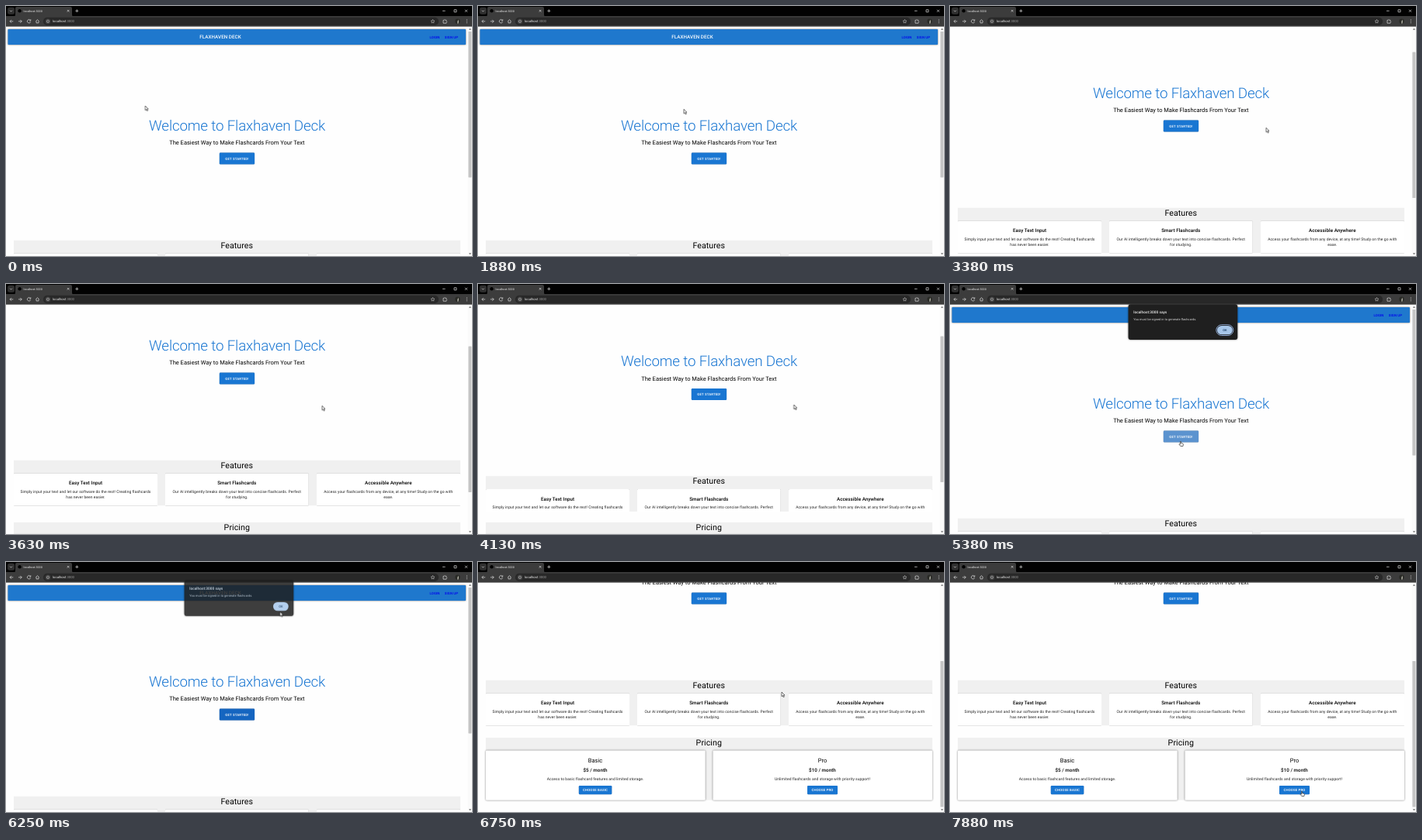
An HTML page for the animation above (8 s loop, 600x323 px).

```html
<!DOCTYPE html>
<html lang="en">
<head>
<meta charset="utf-8">
<title>Flaxhaven Deck</title>
<style>
html, body { margin: 0; width: 100%; height: 100%; overflow: hidden; background: #fff; }
svg { display: block; width: 100vw; height: 100vh; }
svg, .cursor, .arrow, .hand, .dialog, .ring, .start { animation: 8s step-end infinite; }
svg { --scroll: 0px; --lower: 0px; animation-name: scroll; }
text { font-family: Roboto, Arial, sans-serif; text-rendering: geometricPrecision; }
.mid { text-anchor: middle; }
.page { transform: translateY(calc(-1 * var(--scroll))); }
.lower { transform: translateY(calc(-1 * var(--lower))); }
.thumb { transform: translateY(calc(.633 * var(--scroll))); }
.h2 { font-size: 18.75px; font-weight: 300; letter-spacing: -.156px; fill: #1976d2; }
.h4 { font-size: 10.625px; letter-spacing: .078px; }
.h5 { font-size: 7.5px; }
.h6 { font-size: 6.25px; font-weight: 500; letter-spacing: .047px; }
.body { font-size: 5px; letter-spacing: .047px; fill: #222; }
.label { font-size: 4.375px; font-weight: 500; letter-spacing: .125px; fill: #fff; }
.link { fill: #00e; }
.band { fill: #f0f0f0; }
.card { fill: #fff; filter: drop-shadow(0 .5px .6px #0006); }
.raised { filter: drop-shadow(0 .8px .9px #0008); }
.button { fill: #1976d2; filter: drop-shadow(0 .7px .6px #0005); }
.start { animation-name: press; }
.icon { fill: none; stroke: #ddd; stroke-width: .7; }
.cursor { animation-name: move; }
.arrow { animation-name: arrow; }
.hand { animation-name: hand; }
.arrow, .hand { fill: #fff; stroke: #111; stroke-width: .6; stroke-linejoin: round; }
.dialog { animation-name: dialog; }
.ring { animation-name: ring; }

@keyframes scroll {
  0% { --scroll: 0px; --lower: 0px; }
  42.18% { --scroll: 42px; --lower: 42px; }
  43.75% { --scroll: 69px; --lower: 69px; }
  45.31% { --scroll: 75px; --lower: 69px; }
  50% { --scroll: 69px; --lower: 69px; }
  51.56% { --scroll: 54.5px; --lower: 69px; }
  53.12% { --scroll: 36px; --lower: 36px; }
  54.68% { --scroll: 18px; --lower: 18px; }
  56.25% { --scroll: 5px; --lower: 5px; }
  57.81% { --scroll: 0px; --lower: 0px; }
  81.25% { --scroll: 45px; --lower: 45px; }
  82.81% { --scroll: 118px; --lower: 118px; }
  84.37%, 100% { --scroll: 150px; --lower: 150px; }
}
@keyframes move {
  0% { transform: translate(179.3px, 129px); }
  17.18% { transform: translate(322px, 172px); }
  20.31% { transform: translate(360px, 202px); }
  21.87% { transform: translate(312px, 167px); }
  23.43% { transform: translate(265px, 133.3px); }
  26.56% { transform: translate(251.5px, 148px); }
  32.81% { transform: translate(243px, 152px); }
  42.18% { transform: translate(407px, 157.3px); }
  50% { transform: translate(406.7px, 156px); }
  56.25% { transform: translate(392px, 161px); }
  57.81% { transform: translate(362px, 176px); }
  59.37% { transform: translate(328px, 192px); }
  60.93% { transform: translate(304px, 201px); }
  62.5% { transform: translate(297px, 203px); }
  68.75% { transform: translate(303px, 181px); }
  70.31% { transform: translate(320px, 138px); }
  71.87% { transform: translate(341px, 91px); }
  73.43% { transform: translate(351px, 68px); }
  75% { transform: translate(352.7px, 64.3px); }
  79.68% { transform: translate(356px, 78px); }
  81.25% { transform: translate(370px, 120px); }
  82.81% { transform: translate(384px, 150px); }
  84.37% { transform: translate(391px, 168px); }
  85.93% { transform: translate(397px, 180px); }
  87.5% { transform: translate(402px, 190px); }
  92.18% { transform: translate(413px, 215px); }
  93.75% { transform: translate(427px, 245px); }
  95.31% { transform: translate(440px, 272px); }
  96.87% { transform: translate(450px, 291px); }
  98.43%, 100% { transform: translate(453px, 296px); }
}
@keyframes arrow {
  0% { opacity: 1; }
  60.93% { opacity: 0; }
  68.75% { opacity: 1; }
  96.87%, 100% { opacity: 0; }
}
@keyframes hand {
  0% { opacity: 0; }
  60.93% { opacity: 1; }
  68.75% { opacity: 0; }
  96.87%, 100% { opacity: 1; }
}
@keyframes press {
  0% { fill: #1976d2; }
  60.93% { fill: #1565c0; }
  64.06% { fill: #5b93cf; }
  75% { fill: #1565c0; }
  79.68%, 100% { fill: #1976d2; }
}
@keyframes dialog {
  0% { opacity: 0; transform: none; }
  64.06% { opacity: .7; transform: translateY(-2px); }
  65.62% { opacity: 1; transform: none; }
  78.12% { opacity: .86; transform: translateY(-2.2px); }
  79.68%, 100% { opacity: 0; transform: none; }
}
@keyframes ring {
  0% { opacity: 1; }
  76.56%, 100% { opacity: 0; }
}
</style>
</head>
<body>
<svg viewBox="0 0 600 323" preserveAspectRatio="none">
  <rect width="600" height="323" fill="#fefefe"/>

  <g class="page">
    <rect class="raised" x="2.5" y="30" width="589.5" height="20" rx=".8" fill="#1f78cd"/>
    <text class="h6 mid" x="276" y="42.2" fill="#fff">FLAXHAVEN DECK</text>
    <text class="label link mid" x="552" y="41.6">LOGIN</text>
    <text class="label link mid" x="573.5" y="41.6">SIGN UP</text>

    <text class="h2 mid" x="297.5" y="160.8">Welcome to Flaxhaven Deck</text>
    <text class="h5 mid" x="297.3" y="179.4">The Easiest Way to Make Flashcards From Your Text</text>
    <rect class="button start" x="274.8" y="189.6" width="45.3" height="15" rx="1.25"/>
    <text class="label mid" x="297.5" y="198.7">GET STARTED!</text>

    <rect class="band" x="10" y="302.8" width="575" height="58.5"/>
    <text class="h4 mid" x="297.3" y="312.8">Features</text>
    <rect class="card" x="10" y="319.6" width="185" height="42" rx="1.25"/>
    <rect class="card" x="205" y="319.6" width="184.7" height="42" rx="1.25"/>
    <rect class="card" x="400" y="319.6" width="185" height="42" rx="1.25"/>
    <g class="mid">
      <text class="h6" x="102.5" y="334.3">Easy Text Input</text>
      <text class="body" x="102.5" y="344.7">Simply input your text and let our software do the rest! Creating flashcards</text>
      <text class="body" x="102.5" y="352.2">has never been easier.</text>
      <text class="h6" x="297.3" y="334.3">Smart Flashcards</text>
      <text class="body" x="297.3" y="344.7">Our AI intelligently breaks down your text into concise flashcards. Perfect</text>
      <text class="body" x="297.3" y="352.2">for studying.</text>
      <text class="h6" x="492.3" y="334.3">Accessible Anywhere</text>
      <text class="body" x="492.3" y="344.7">Access your flashcards from any device, at any time! Study on the go with</text>
      <text class="body" x="492.3" y="352.2">ease.</text>
    </g>
  </g>

  <g class="lower">
    <rect y="363" width="594" height="130" fill="#fefefe"/>
    <rect class="band" x="10" y="377" width="575" height="80.5"/>
    <text class="h4 mid" x="297.3" y="387.2">Pricing</text>
    <rect class="card raised" x="10" y="393.6" width="282.7" height="64.2" rx="1.25"/>
    <rect class="card raised" x="302.5" y="393.6" width="282.5" height="64.2" rx="1.25"/>
    <rect class="button" x="129.8" y="439" width="42.5" height="11.2" rx="1.25"/>
    <rect class="button" x="424" y="439" width="39" height="11.2" rx="1.25"/>
    <g class="mid">
      <text class="h5" x="151" y="409">Basic</text>
      <text class="h6" x="151" y="421.2">$5 / month</text>
      <text class="body" x="151" y="431.8">Access to basic flashcard features and limited storage.</text>
      <text class="label" x="151" y="446.2">CHOOSE BASIC</text>
      <text class="h5" x="443.5" y="409">Pro</text>
      <text class="h6" x="443.5" y="421.2">$10 / month</text>
      <text class="body" x="443.5" y="431.8">Unlimited flashcards and storage with priority support!</text>
      <text class="label" x="443.5" y="446.2">CHOOSE PRO</text>
    </g>
  </g>

  <!-- Scrollbar -->
  <rect x="594.5" y="26" width="5.5" height="297" fill="#fafafa"/>
  <rect class="thumb" x="595.4" y="33" width="4" height="188.5" rx=".4" fill="#c4c4c4"/>
  <path d="M596 30.8l1.5-2 1.5 2zM596 319.3l1.5 2 1.5-2z" fill="#666"/>

  <!-- Browser chrome -->
  <rect width="600" height="14" fill="#020202"/>
  <path d="M10 13.5q2 0 2-2V3q0-2 2-2h69q2 0 2 2v8.500q0 2 2 2z" fill="#3c3c3c"/>
  <rect y="13" width="600" height="13.6" fill="#3c3c3c"/>
  <rect x="2" y="1.800" width="9" height="9" rx="2.500" fill="#303030"/>
  <circle cx="17.600" cy="6.300" r="2.200" fill="#000"/>
  <text x="22.500" y="7.700" font-size="3.700" fill="#eee">localhost:3000</text>
  <rect x="48" y="14.700" width="509" height="10.300" rx="5.100" fill="#282828"/>
  <circle cx="54" cy="19.800" r="3.600" fill="#3c3c3c"/>
  <text x="60" y="21.300" font-size="4.250" fill="#eee">localhost<tspan fill="#999">:3000</tspan></text>
  <g class="icon">
    <path d="M5 5.700l1.500 1.500 1.500-1.500M78.800 5l2.600 2.600m0-2.600l-2.600 2.600M89.300 6.300h4m-2-2v4"/>
    <path d="M562 6.300h3.600M577 4.800h3v3h-3zM591 4.800l3 3m0-3l-3 3"/>
    <path d="M9.300 19.800H5m2-2l-2 2 2 2M16 19.800h4.300m-2-2l2 2-2 2"/>
    <path d="M31.400 18.500a2.200 2.200 0 1 0 .3 1.900M31.800 17.200v1.800H30"/>
    <path d="M38.500 19.500l2-1.900 2 1.900M39 19.200v2.700h3v-2.700"/>
    <circle cx="54" cy="19.800" r="1.700" stroke-width=".5"/>
    <path d="M54 19.500v1.200" stroke-width=".5"/>
    <path d="M549.500 17.500l.7 1.500 1.700.2-1.200 1.100.3 1.700-1.500-.8-1.500.8.3-1.700-1.200-1.100 1.700-.2z" stroke-width=".5"/>
    <path d="M563 18.300h1.300q.7-1.600 1.400 0h1.300v1.300q1.400.7 0 1.400v1.200h-4z"/>
  </g>
  <circle cx="581.500" cy="19.800" r="3.200" fill="#292a26"/>
  <path d="M581.400 22.700q-.3-3.500.9-5.300 1 2.300.1 5.300z" fill="#c9c9bd"/>
  <g fill="#ddd"><circle cx="593.300" cy="17.800" r=".5"/><circle cx="593.300" cy="19.800" r=".5"/><circle cx="593.300" cy="21.800" r=".5"/></g>

  <g class="dialog">
    <rect class="raised" x="229.600" y="26.300" width="140.600" height="45.700" rx="3" fill="#1f1f1f"/>
    <text x="236.300" y="38" font-size="4.800" font-weight="500" fill="#eee">localhost:3000 says</text>
    <text x="236.300" y="46.900" font-size="4" fill="#d5d5d5">You must be signed in to generate flashcards.</text>
    <rect class="ring" x="342.800" y="52.700" width="22" height="13.800" rx="6.900" fill="none" stroke="#a8c7fa" stroke-width=".8"/>
    <rect x="344" y="53.900" width="19.700" height="11.400" rx="5.700" fill="#a8c7ea"/>
    <text class="mid" x="353.900" y="61.100" font-size="4" font-weight="500" fill="#173a63">OK</text>
  </g>

  <g class="cursor">
    <path class="arrow" d="M0 0v5.700l1.300-1.200 1 2.200 1-.5-1-2.100h1.700z"/>
    <path class="hand" d="M-.6.600q.6-.9 1.200 0v2.200l2.200.5q.7.200.6 1L3 6.500H-.2L-2 4.200q.1-.9 1.400 0z"/>
  </g>
</svg>
</body>
</html>
```
